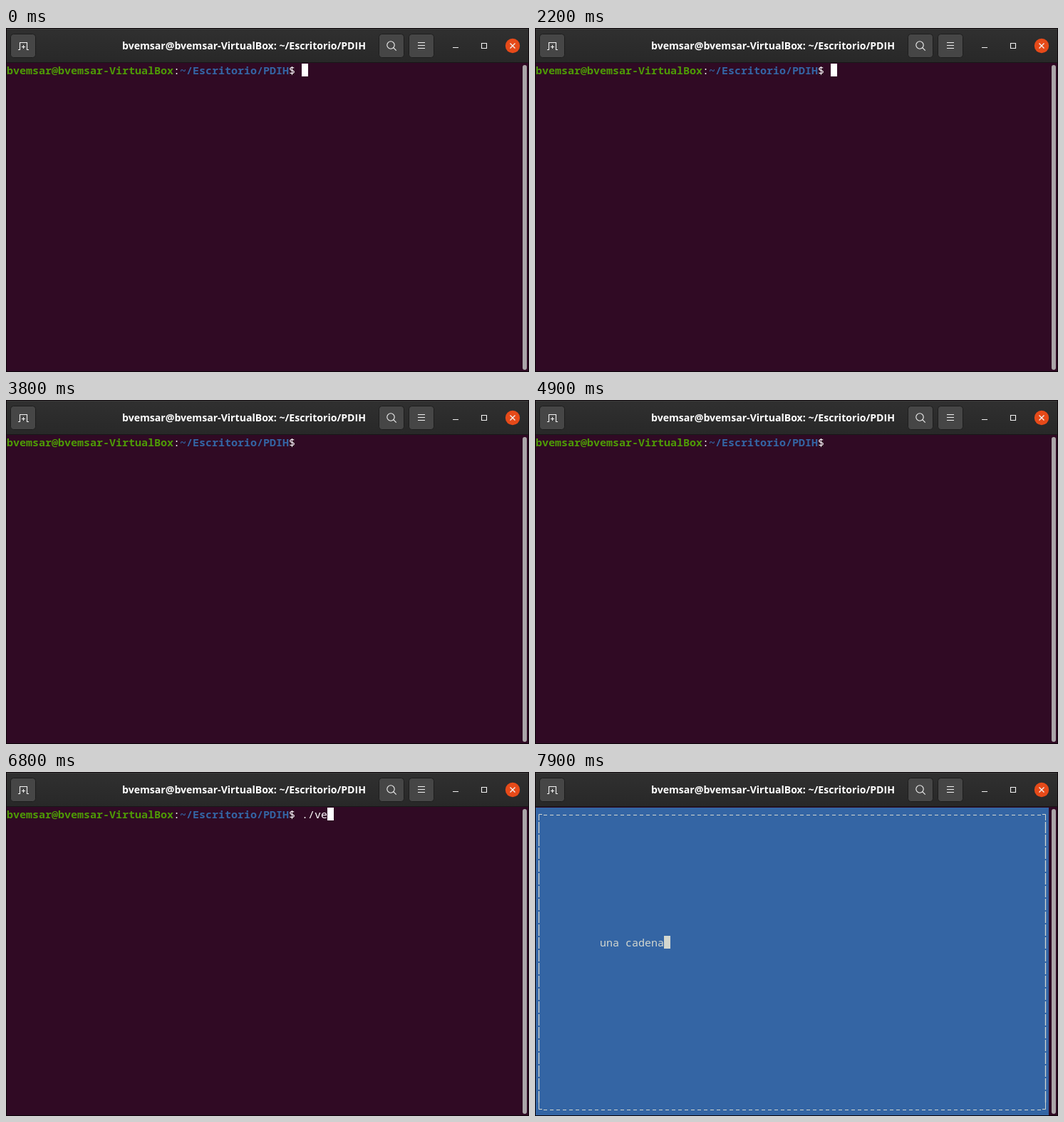
An HTML page for the animation above (8 s loop, 734 px wide and 483 px high).

```html
<!DOCTYPE html>
<html lang="es">
<head>
<meta charset="utf-8">
<title>Terminal</title>
<style>
  html, body { margin: 0; width: 100%; height: 100%; overflow: hidden; background: #300a24; }
  svg { display: block; }
  .mono { font: 15px "Noto Sans Mono", monospace; white-space: pre; }
  .bold { font-weight: 700; }
  .title { font: 700 14.1px "Open Sans", sans-serif; fill: #fff; text-anchor: middle; }
  .button { fill: #464646; stroke: #1d1d1d; }
  .icon { fill: none; stroke: #f2f2f2; stroke-width: 1.1; }
  .frame { fill: none; stroke: #d3d7cf; }
</style>
</head>
<body>
<svg width="734" height="483" viewBox="0 0 734 483">
  <defs>
    <linearGradient id="bar" x2="0" y2="1">
      <stop stop-color="#303030"/>
      <stop offset="1" stop-color="#282828"/>
    </linearGradient>
  </defs>

  <rect width="734" height="483" fill="#0c0509"/>
  <rect x="1" y="1" width="732" height="47" fill="url(#bar)"/>
  <rect x="1" y="1" width="732" height="1" fill="#3c3c3c"/>
  <rect x="1" y="48" width="732" height="1" fill="#181818"/>
  <rect x="1" y="49" width="732" height="433" fill="#300a24"/>

  <rect class="button" x="6.5" y="8.5" width="35" height="33" rx="4"/>
  <rect class="button" x="523.5" y="8.5" width="35" height="33" rx="4"/>
  <rect class="button" x="565.5" y="8.5" width="35" height="33" rx="4"/>
  <g class="icon">
    <path d="M17 30.5h2.5v-10h10v10h2.500M22 26.500h5M24.500 24v5"/>
    <circle cx="540" cy="24" r="5.200"/>
    <path d="M543.700 27.700l4 4M578 20.500h10M578 24.500h10M578 28.500h10"/>
    <path d="M627 27.500h8M667.500 21.500h7v7h-7z"/>
  </g>
  <circle cx="711" cy="25" r="10.200" fill="#e64a19"/>
  <path class="icon" d="M707.500 21.500l7 7M714.500 21.500l-7 7" style="stroke-width:1.400"/>
  <text class="title" x="334" y="30">bvemsar@bvemsar-VirtualBox: ~/Escritorio/PDIH</text>

  <g id="shell" class="mono" fill="#fff">
    <text class="bold" x="1" y="65" fill="#4e9a06">bvemsar@bvemsar-VirtualBox</text>
    <text x="235" y="65">:</text>
    <text class="bold" x="244" y="65" fill="#3465a4">~/Escritorio/PDIH</text>
    <text x="397" y="65">$</text>
    <text id="command" x="415" y="65"></text>
    <rect id="cursor" y="50" width="9" height="18"/>
  </g>

  <g id="dialog" visibility="hidden">
    <rect x="1" y="50" width="720" height="432" fill="#3465a4"/>
    <g class="frame">
      <path stroke-dasharray="5 4" d="M12 60.500H710M12 474.500H710"/>
      <path stroke-dasharray="16 2" stroke-width="1.300" d="M5.500 70V465M716.500 70V465"/>
      <path d="M5.500 68V59.500H10M712 59.500H716.500V68M5.500 464V473.500H10M712 473.500H716.500V464"/>
    </g>
    <text class="mono" x="91" y="245" fill="#d3d7cf">una cadena</text>
    <rect x="181" y="230" width="9" height="18" fill="#d3d7cf"/>
  </g>

  <rect x="725" y="52" width="6" height="428" rx="3" fill="#aaa5a8"/>
</svg>
<script>
  const LOOP = 8000, DIALOG_AT = 7900, CELL = 9;
  const COMMAND = "./ventana";
  const blinks = [500, 1100, 1600, 2200, 2800, 3300, 3800, 4400, 4900, 5500];
  const keys = [5700, 6300, 6700, 6800, 7000, 7100, 7200, 7300, 7400];
  const HIDDEN_FROM = 6200, HIDDEN_TO = 6300;
  const byId = id => document.getElementById(id);
  const command = byId("command"), cursor = byId("cursor");
  const shell = byId("shell"), dialog = byId("dialog");

  const countPast = (times, t) => times.filter(time => time <= t).length;
  const show = (node, on) => node.setAttribute("visibility", on ? "visible" : "hidden");

  function draw(now) {
    const t = now % LOOP;
    const typed = countPast(keys, t);
    const lit = countPast(blinks, t) % 2 === 0 && !(t >= HIDDEN_FROM && t < HIDDEN_TO);
    const open = t >= DIALOG_AT;

    command.textContent = COMMAND.slice(0, typed);
    cursor.setAttribute("x", 415 + typed * CELL);
    show(shell, !open);
    show(cursor, lit && !open);
    show(dialog, open);
    requestAnimationFrame(draw);
  }

  draw(0);
</script>
</body>
</html>
```
